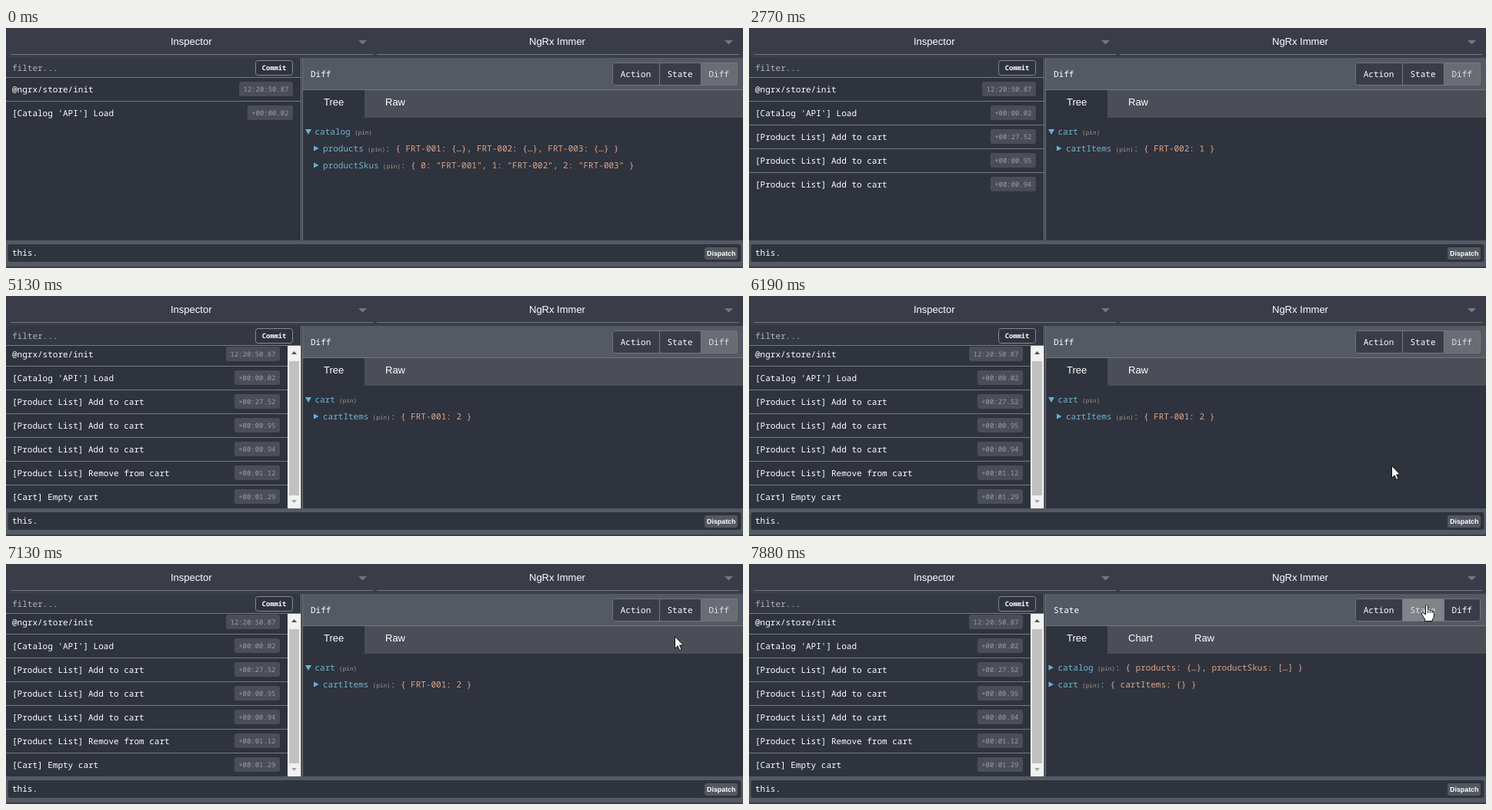
Write an HTML page with a canvas that moves like this. It is 958x313 px and loops after 8000 ms.

```html
<!DOCTYPE html>
<html lang="en">
<head>
<meta charset="utf-8">
<title>Store inspector</title>
<style>
  html, body { margin: 0; width: 100%; height: 100%; overflow: hidden; background: #2f333d; }
  canvas { display: block; width: 958px; height: 313px; }
</style>
</head>
<body>
<canvas id="stage" width="958" height="313"></canvas>
<script>
const ctx = document.getElementById('stage').getContext('2d');
const LOOP = 8000;
const MONO = '"Noto Sans Mono", "DejaVu Sans Mono", monospace';
const SANS = '"Liberation Sans", Arial, sans-serif';
const CHAR = 6.6;
const C = {
  pane: '#2f333d', bar: '#3a3d48', head: '#535a63', tabs: '#4b4e57',
  line: '#74787f', badge: '#4b4e57', stamp: '#9a9ca0', key: '#6fb3d2',
  value: '#dba58a', pin: '#a8988c', text: '#ffffff', chosen: '#696c73'
};

// Each entry: time it appears, label, stamp
const actions = [
  [0, '@ngrx/store/init', '12:20:50.87'],
  [0, "[Catalog 'API'] Load", '+00:00.02'],
  [980, '[Product List] Add to cart', '+00:27.52'],
  [1840, '[Product List] Add to cart', '+00:00.95'],
  [2770, '[Product List] Add to cart', '+00:00.94'],
  [3860, '[Product List] Remove from cart', '+00:01.12'],
  [5130, '[Cart] Empty cart', '+00:01.29']
];
const SCROLL_AT = 5130, CURSOR_AT = 6010, HOVER_AT = 7420, CLICK_AT = 7650;

// Pointer hot spot: time, x, y
const path = [
  [6010, 822, 298], [6100, 828, 258], [6190, 835, 221], [6370, 847, 174],
  [6560, 857, 140], [6740, 862, 126], [6840, 862, 126], [7130, 869, 94],
  [7230, 871, 88], [7420, 877, 70], [7620, 881, 53], [8000, 881, 53]
];

function rect(x, y, w, h, color) {
  ctx.fillStyle = color;
  ctx.fillRect(x, y, w, h);
}

function round(x, y, w, h, r, fill, stroke) {
  ctx.beginPath();
  ctx.roundRect(x, y, w, h, r);
  if (fill) { ctx.fillStyle = fill; ctx.fill(); }
  if (stroke) { ctx.strokeStyle = stroke; ctx.lineWidth = 1; ctx.stroke(); }
}

function poly(points, color) {
  ctx.beginPath();
  points.forEach(([x, y]) => ctx.lineTo(x, y));
  ctx.closePath();
  ctx.fillStyle = color;
  ctx.fill();
}

function write(str, x, y, color, font) {
  ctx.font = font;
  ctx.fillStyle = color;
  ctx.fillText(str, x, y);
}

const mono = (str, x, y, color = C.text, size = 11, weight = 400) =>
  write(str, x, y, color, `${weight} ${size}px ${MONO}`);
const sans = (str, x, y) => write(str, x, y, C.text, `13px ${SANS}`);

function mix(a, b, k) {
  return `rgb(${a.map((v, i) => Math.round(v + (b[i] - v) * k))})`;
}

function drawTop() {
  rect(0, 0, 958, 39, C.bar);
  [[6, 215, 'Inspector'], [482, 681, 'NgRx Immer']].forEach(([x, tx, label]) => {
    rect(x, 34, 471, 1, C.line);
    sans(label, tx - 1, 22);
    poly([[x + 452, 16], [x + 463, 16], [x + 457.5, 21.5]], '#73777f');
  });
}

function drawScrollbar() {
  rect(366, 65, 17, 212, '#f1f1f1');
  rect(368, 85, 13, 175, '#c1c1c1');
  poly([[371, 76], [378, 76], [374.5, 72]], '#505050');
  poly([[371, 266], [378, 266], [374.5, 270]], '#a3a3a3');
}

function drawList(t) {
  const scrolled = t >= SCROLL_AT;
  const right = scrolled ? 356 : 373;
  const shown = actions.filter(a => t >= a[0]);
  rect(0, 39, 383, 238, C.pane);
  ctx.save();
  ctx.beginPath();
  ctx.rect(0, 65, 383, 212);
  ctx.clip();
  shown.forEach(([, label, stamp], i) => {
    const y = 65 + i * 31 - (scrolled ? 4 : 0);
    const w = stamp.length * 5.36 + 11;
    mono(label, 8, y + 19);
    round(right - w, y + 5, w, 19, 3, C.badge);
    mono(stamp, right - w + 5.5, y + 18, C.stamp, 8.93, 500);
    if (i < shown.length - 1) rect(0, y + 30, 383, 1, C.line);
  });
  if (scrolled) drawScrollbar();
  ctx.restore();
  rect(0, 39, 383, 25, '#343842');
  rect(0, 64, 383, 1, C.line);
  mono('filter...', 8, 56, '#b4b6ba');
  round(324.5, 42.5, 48, 19, 3, C.pane, '#858990');
  mono('Commit', 332.7, 55, C.text, 8.8, 700);
}

function drawButtons(t) {
  const clicked = t >= CLICK_AT;
  const fade = Math.min(1, Math.max(0, (t - CLICK_AT) / 200));
  const dark = [58, 61, 71], hover = [83, 87, 95], lit = [128, 131, 136], chosen = [105, 108, 115];
  const over = Math.min(1, Math.max(0, (t - HOVER_AT) / 120));
  const fills = [
    mix(dark, dark, 0),
    clicked ? mix(hover, lit, fade) : mix(dark, hover, over),
    mix(chosen, dark, fade)
  ];
  ctx.save();
  ctx.beginPath();
  ctx.roundRect(788, 45, 163, 30, 3);
  ctx.clip();
  rect(788, 45, 61, 30, fills[0]);
  rect(849, 45, 54, 30, fills[1]);
  rect(903, 45, 48, 30, fills[2]);
  ctx.restore();
  round(788.5, 45.5, 162, 29, 3, null, '#73777e');
  rect(849, 45, 1, 30, '#73777e');
  rect(903, 45, 1, 30, '#73777e');
  mono('Action', 798.7, 64, C.text, 11, 500);
  mono('State', 859.5, 64, clicked ? '#e2e3e5' : C.text, 11, 500);
  mono('Diff', 913.5, 64, clicked ? C.text : '#e2e3e5', 11, 500);
}

function arrow(x, y, open) {
  poly(open ? [[x, y - 3], [x + 8, y - 3], [x + 4, y + 4]]
            : [[x + 0.5, y - 3.5], [x + 7, y], [x + 0.5, y + 3.5]], '#62b2da');
}

function node(key, x, y, value) {
  arrow(x - 12.5, y, !value);
  mono(key, x, y + 4, C.key);
  const pinX = x + key.length * CHAR + 5.2;
  mono('(pin)', pinX, y + 4, C.pin, 7.7);
  if (!value) return;
  mono(':', pinX + 23.1, y + 4, C.key);
  mono(value, pinX + 23.1 + 2 * CHAR, y + 4, C.value);
}

function drawTree(t) {
  const x = 401.5, sub = 412;
  if (t >= CLICK_AT) {
    node('catalog', x, 135, '{ products: {…}, productSkus: […] }');
    node('cart', x, 157, '{ cartItems: {} }');
  } else if (t < 980) {
    node('catalog', x, 135);
    node('products', sub, 157, '{ FRT-001: {…}, FRT-002: {…}, FRT-003: {…} }');
    node('productSkus', sub, 179, '{ 0: "FRT-001", 1: "FRT-002", 2: "FRT-003" }');
  } else {
    const item = t < 1840 ? 'FRT-001: 1' : t >= 2770 && t < 5130 ? 'FRT-002: 1' : 'FRT-001: 2';
    node('cart', x, 135);
    node('cartItems', sub, 157, `{ ${item} }`);
  }
}

function drawDetail(t) {
  const state = t >= CLICK_AT;
  rect(386, 39, 572, 41, C.head);
  rect(386, 80, 572, 1, C.line);
  rect(386, 81, 572, 36, C.tabs);
  rect(386, 81, 80, 196, C.pane);
  rect(466, 117, 492, 160, C.pane);
  mono(state ? 'State' : 'Diff', 396, 64);
  drawButtons(t);
  sans('Tree', 413, 101);
  if (state) sans('Chart', 493, 101);
  sans('Raw', state ? 579 : 493, 101);
  drawTree(t);
}

function drawBottom() {
  rect(0, 277, 958, 34, C.head);
  rect(0, 311, 958, 2, C.bar);
  round(2.5, 282, 953, 23, 3, C.pane);
  mono('this.', 8, 297);
  round(908, 286, 43, 16, 3, '#53575f');
  write('Dispatch', 911, 297, C.text, `bold 8.9px ${SANS}`);
}

function pointerAt(t) {
  const i = path.findIndex(p => p[0] > t);
  const [t0, x0, y0] = path[i - 1], [t1, x1, y1] = path[i];
  const k = (t - t0) / (t1 - t0);
  return [Math.round(x0 + (x1 - x0) * k), Math.round(y0 + (y1 - y0) * k)];
}

const ARROW = new Path2D('M.5 .5V16.2L4.1 12.8L6.6 18.4L9 17.4L6.6 11.9H11.4Z');
const HAND = new Path2D('M-1.5 1.5Q0 -1 1.5 1.5V7Q3.5 5.8 4.3 7.8Q6.2 6.8 7 8.8' +
  'Q9 8.2 9.3 10.5V15Q9 18 7.3 19V21.5H-2.5V19Q-4.5 16 -6.5 12.2Q-6.8 9.8 -4.5 10.6L-1.5 13Z');

function drawPointer(t) {
  if (t < CURSOR_AT) return;
  const hand = t >= HOVER_AT;
  ctx.save();
  ctx.translate(...pointerAt(t));
  ctx.lineWidth = 1;
  ctx.lineJoin = 'round';
  ctx.fillStyle = '#fff';
  ctx.strokeStyle = '#111';
  const shape = hand ? HAND : ARROW;
  ctx.fill(shape);
  ctx.stroke(shape);
  if (hand) {
    ctx.beginPath();
    for (const x of [1.5, 4.3, 7]) {
      ctx.moveTo(x, 8);
      ctx.lineTo(x, 11);
    }
    ctx.stroke();
  }
  ctx.restore();
}

function draw(t) {
  ctx.textRendering = 'geometricPrecision';
  drawTop();
  drawList(t);
  drawDetail(t);
  rect(383, 39, 3, 238, C.pane);
  rect(383, 39, 1, 238, C.line);
  rect(385, 39, 1, 238, C.line);
  drawBottom();
  drawPointer(t);
}

const start = performance.now();
function tick() {
  draw((performance.now() - start) % LOOP);
  requestAnimationFrame(tick);
}
tick();
</script>
</body>
</html>
```
